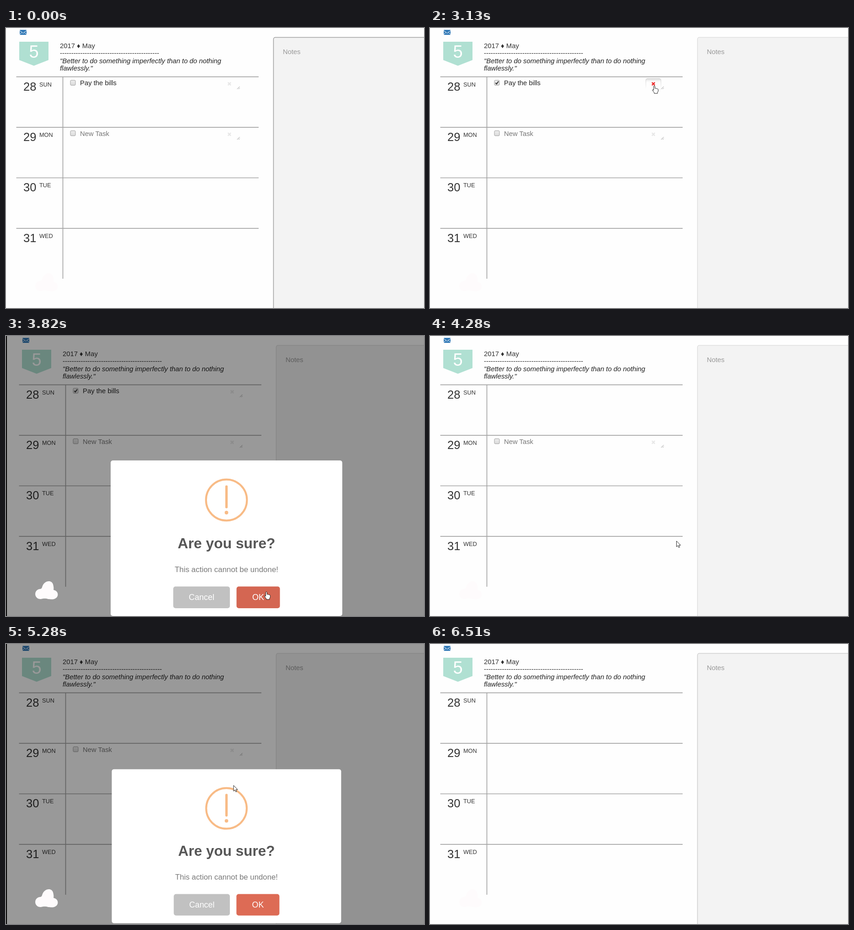
These frames come from a looping animation (915 by 612 pixels, 6820 ms). An HTML page:

```html
<!DOCTYPE html>
<html lang="en">
<head>
<meta charset="utf-8">
<title>Weekly planner</title>
<style>
html, body { margin: 0; width: 100%; height: 100%; overflow: hidden; background: #fefefe; }
svg { display: block; font-family: "Liberation Sans", Arial, sans-serif; font-size: 14.84px; fill: #333; }
.rule { stroke: #a4a4a4; stroke-width: 1.7; }
.day { font-size: 25.44px; }
.weekday { font-size: 12.72px; }
.button { font-size: 18px; fill: #fff; text-anchor: middle; }
</style>
</head>
<body>
<svg width="915" height="612" viewBox="0 0 915 612">
  <defs>
    <linearGradient id="box" x2="0" y2="1"><stop stop-color="#eee"/><stop offset="1" stop-color="#dadada"/></linearGradient>
    <linearGradient id="inset" x2="0" y2="1"><stop stop-color="#dcdcdc"/><stop offset=".25" stop-color="#f8f8f8"/><stop offset=".4" stop-color="#fefefe"/></linearGradient>
    <linearGradient id="edge" x2="0" y2="1"><stop stop-color="#ccc"/><stop offset=".6" stop-color="#e6e6e6"/><stop offset="1" stop-color="#fefefe"/></linearGradient>
  </defs>
  <g id="page">
    <rect x="30" y="4" width="15" height="11" rx="1.2" fill="#337ab7"/>
    <path d="M30 5.5L37.5 11.5L45 5.5M30 14L34.5 9.8M45 14L40.5 9.8" fill="none" stroke="#fff" stroke-width="1"/>
    <path d="M29 30H93V70L61 82.5L29 70Z" fill="#b0e0d2"/>
    <text x="61" y="64.5" font-size="38" text-anchor="middle" fill="#fff">5</text>
    <text x="118" y="44">2017 ♦ May</text>
    <text x="118" y="60" id="dashes"></text>
    <g font-style="italic" fill="#222">
      <text x="118" y="76.5">"Better to do something imperfectly than to do nothing</text>
      <text x="118" y="92.7">flawlessly."</text>
    </g>
    <g id="days"></g>
    <path class="rule" d="M124.5 107V548"/>
    <g id="tasks"></g>
    <rect id="notes" x="585.5" y="20.5" width="360" height="640" rx="4" fill="#f3f3f3" stroke-width="1.5"/>
    <text x="606" y="56.5" fill="#999">Notes</text>
  </g>
  <g id="dim">
    <rect width="915" height="612" fill="#000"/>
  </g>
  <rect id="strip" width="2" height="612" fill="#000"/>
  <path fill="#fefbfc" d="M76 575C61 575 60 555 74 553Q78 553 79 549C83 534 100 532 103 543Q105 550 104 555C115 557 116 569 109 573C104 577 97 575 92 575C86 573 82 574 76 575Z"/>
  <g id="modal">
    <rect x="-253.5" y="-170" width="507" height="340" rx="5" fill="#fff"/>
    <g fill="#f8bb86">
      <circle cy="-83.5" r="44.8" fill="none" stroke="#f8bb86" stroke-width="4.2"/>
      <rect x="-2.6" y="-115.5" width="5.3" height="50" rx="2.1"/>
      <circle cy="-56" r="3.9"/>
    </g>
    <g text-anchor="middle">
      <text y="21.5" font-size="31.8" font-weight="bold" fill="#575757">Are you sure?</text>
      <text y="74" font-size="16.96" fill="#797979">This action cannot be undone!</text>
    </g>
    <rect x="-116.5" y="105.5" width="124" height="47.5" rx="5" fill="#c1c1c1"/>
    <text class="button" x="-54.5" y="135">Cancel</text>
    <rect id="ok" x="22" y="105.5" width="95" height="47.5" rx="5"/>
    <text class="button" x="69.5" y="135">OK</text>
  </g>
  <path id="cursor" stroke-linejoin="round"/>
</svg>
<script>
const LOOP = 6820, START = 290, STEP = 76.8, PITCH = 110.4;
const $ = id => document.getElementById(id);
const show = (el, on) => el.setAttribute('display', on ? 'inline' : 'none');
const set = (el, attrs) => { for (const name in attrs) el.setAttribute(name, attrs[name]); };

const cursors = {
  arrow: 'M0 0V12.6L3 9.9L4.9 14.3L7 13.4L5.2 9.2H9Z',
  hand: 'M-1.4 1Q0 -.9 1.4 1V6L3.2 5.6L4.6 6.5L6 6.2L7 7.3Q8.5 7.2 8.5 8.6V12L7 14.8V17H-.2V15.3L-4 10.4Q-4.5 8.3 -2.6 9L-1.4 10.2Z',
  beam: 'M-3 -8Q0 -8 0 -6.5Q0 -8 3 -8M0 -6.5V6.5M-3 8Q0 8 0 6.5Q0 8 3 8'
};

// Each key is [time, value, ...]; values are interpolated linearly and held at the ends.
function track(keys, t) {
  let i = keys.findIndex(k => k[0] > t);
  if (i < 0) return keys[keys.length - 1].slice(1);
  if (i === 0) return keys[0].slice(1);
  const a = keys[i - 1], b = keys[i], p = (t - a[0]) / (b[0] - a[0]);
  return a.slice(1).map((v, j) => v + (b[j + 1] - v) * p);
}

const pointerPath = [
  [290, 720, 590], [520, 470, 395], [750, 215, 185], [900, 174, 154], [1060, 153, 128], [1290, 147.5, 123.5],
  [1760, 147.5, 123.5], [1980, 215, 122], [2440, 480, 121], [2980, 491, 126],
  [3135, 491, 126], [3360, 496, 215], [3740, 542, 496], [3823, 570, 559], [3900, 572, 579],
  [4060, 572, 579], [4280, 540, 450], [4670, 494, 240], [4900, 487, 235],
  [5060, 487, 235], [5300, 499, 315], [5670, 551, 545], [5890, 562, 580], [6210, 580, 625]
];
const borderGray = [[0, 160], [280, 160], [520, 222], [6480, 222], [6510, 208]];
const popScale = [[0, .7], [.45, 1.05], [.8, .95], [1, 1]];
const dialogs = [{ press: 3100, open: 3250, close: 4003 }, { press: 5030, open: 5170, close: 5848 }];

$('dashes').textContent = '-'.repeat(44);
$('days').innerHTML = ['SUN', 'MON', 'TUE', 'WED'].map((name, i) => `
  <g transform="translate(0 ${i * PITCH})">
    <path class="rule" d="M22.5 106.7H553"/>
    <text class="day" x="38" y="136.5">${28 + i}</text>
    <text class="weekday" x="73" y="127.5">${name}</text>
  </g>`).join('');
$('tasks').innerHTML = ['Pay the bills', 'New Task'].map((name, i) => `
  <g id="task${i}" transform="translate(0 ${i * PITCH})">
    <rect id="check${i}" x="141" y="114.2" width="11" height="11" rx="2" fill="url(#box)" stroke="#a0a0a0"/>
    <text x="162" y="125.2" fill="${i ? '#777' : '#222'}">${name}</text>
    <path id="press${i}" d="M472.5 133V114Q472.5 110.5 476 110.5H502Q505.5 110.5 505.5 114V133" fill="url(#inset)" stroke="url(#edge)"/>
    <path id="cross${i}" d="M485.8 118.8L492.2 125.2M492.2 118.8L485.8 125.2" stroke-width="2.6"/>
    <path d="M506 133.5L511.5 128M509.3 133.5L511.5 131.3" stroke="#888" stroke-width=".9"/>
  </g>`).join('');
$('task0').insertAdjacentHTML('beforeend',
  '<path id="tick" d="M143.4 119.8L145.7 122.4L150 116.5" fill="none" stroke="#333" stroke-width="2"/>');

function dialogState(t) {
  const dialog = dialogs.find(d => t >= d.open && t < d.close + 100);
  if (!dialog) return { alpha: 0, scale: 1, locked: false };
  const locked = t < dialog.close;
  if (!locked) {
    const gone = (t - dialog.close) / 100;
    return { alpha: 1 - gone, scale: 1 - .222 * gone, locked };
  }
  const age = t - dialog.open;
  return { alpha: Math.min(1, age / 100), scale: track(popScale, age / 300)[0], locked };
}

function drawCursor(t, x, y, locked, overOk) {
  const inRow = i => y > 109 + i * PITCH && y < 137 + i * PITCH;
  const row = [0, 1].find(i => inRow(i) && !(t >= dialogs[i].close));
  const overCross = row !== undefined && !locked && x > 472 && x < 506;
  const overText = row !== undefined && !locked && x > 162 && x < 472;
  const closing = dialogs.some(d => t >= d.close && t < d.close + 100);
  const kind = overOk || overCross || closing ? 'hand' : overText ? 'beam' : 'arrow';
  set($('cursor'), {
    d: cursors[kind], transform: `translate(${x} ${y})`,
    fill: kind === 'beam' ? 'none' : '#fff', stroke: kind === 'beam' ? '#333' : '#111',
    'stroke-width': kind === 'beam' ? 1 : .9
  });
  show($('cursor'), t >= 280 && t < 6200);
  return overCross ? row : -1;
}

function render(time) {
  const t = time < START - 8 ? 0 : START + STEP * Math.floor((time - START + 8) / STEP);
  const { alpha, scale, locked } = dialogState(t);
  const [x, y] = track(pointerPath, t);
  const overOk = locked && x > 504 && x < 600 && y > 547 && y < 595;
  const hotRow = drawCursor(t, x, y, locked, overOk);

  set($('page'), { transform: `translate(${locked ? 6 : 0} 0)` });
  set($('dim'), { opacity: .4 * alpha });
  show($('strip'), locked);
  show($('modal'), alpha > 0);
  set($('modal'), {
    opacity: alpha,
    transform: `translate(${locked ? '482.6 442' : '477 436'}) scale(${scale})`
  });
  set($('ok'), { fill: overOk ? '#d46652' : '#dd6b55' });

  dialogs.forEach((d, i) => {
    show($('task' + i), t < d.close);
    show($('press' + i), t >= d.press && t < d.open);
    set($('cross' + i), { stroke: hotRow === i ? '#ee3030' : '#e8e8e8' });
  });
  show($('tick'), t >= 1510);
  set($('check0'), { fill: t >= 1430 && t < 1510 ? '#c8c8c8' : 'url(#box)' });

  const gray = track(borderGray, t)[0];
  set($('notes'), { stroke: `rgb(${gray},${gray},${gray})` });
}

const origin = performance.now();
function tick() {
  render((performance.now() - origin) % LOOP);
  requestAnimationFrame(tick);
}
tick();
</script>
</body>
</html>
```
